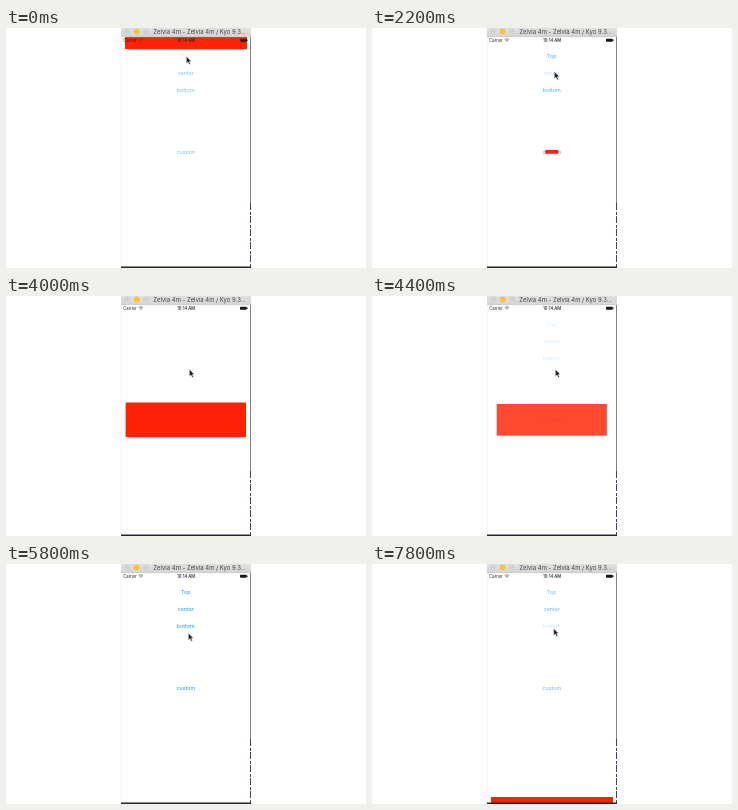
Animation, 360 px wide and 240 px high, one loop 8000 ms. Source, as an HTML page:

```html
<!DOCTYPE html>
<html lang="en">
<head>
<meta charset="utf-8">
<title>Popup demo</title>
<style>
  html, body { margin: 0; width: 100%; height: 100%; overflow: hidden; background: #fff; }
  svg { display: block; width: 100vw; height: 100vh; }
  text { font-family: Inter, "Open Sans", sans-serif; text-anchor: middle; }
  .title { font-size: 5.95px; fill: #444; }
  .status { font-size: 4.2px; fill: #222; }
  .button { font-size: 5.4px; fill: #2597ee; }
</style>
</head>
<body>
<svg viewBox="0 0 360 240">
  <defs>
    <linearGradient id="chrome" x2="0" y2="1">
      <stop stop-color="#e0e0e0"/>
      <stop offset="1" stop-color="#d4d4d4"/>
    </linearGradient>
  </defs>
  <rect width="360" height="240" fill="#fff"/>

  <g id="buttons">
    <text class="button" x="179.8" y="29.8">Top</text>
    <text class="button" x="179.8" y="46.8">center</text>
    <text class="button" x="179.8" y="63.9">bottom</text>
    <text class="button" x="179.8" y="125.7">custom</text>
  </g>

  <rect id="bar" fill="#ff2206"/>

  <g>
    <text class="status" x="124.1" y="13.7">Carrier</text>
    <g fill="none" stroke="#444" stroke-width=".6">
      <path d="M132.7 11.5q2.2-1.7 4.4 0"/>
      <path d="M133.6 12.6q1.3-1 2.6 0"/>
      <path d="M134.5 13.6h.8"/>
    </g>
    <text class="status" x="180" y="13.8" font-weight="500">10:14 AM</text>
    <rect x="234" y="10.8" width="6.8" height="2.9" rx=".6" fill="#181818"/>
    <rect x="241" y="11.6" width=".7" height="1.3" fill="#181818"/>
  </g>

  <rect x="115" width="130" height="9" fill="url(#chrome)"/>
  <path d="M115 8.8h130" stroke="#c4c4c4" stroke-width=".4"/>
  <circle cx="121.3" cy="3.4" r="2.8" fill="#d2d2d4"/>
  <circle cx="130.6" cy="3.4" r="2.8" fill="#fcc22f"/>
  <circle cx="140.2" cy="3.4" r="2.8" fill="#d2d2d4"/>
  <text class="title" x="193.6" y="5.6">Zelvia 4m - Zelvia 4m / Kyo 9.3...</text>

  <path d="M115.2 9v230" stroke="#e8e8e8" stroke-width=".5"/>
  <path d="M244.5 9v166" stroke="#5b6472" stroke-width=".8"/>
  <path d="M244.5 175v64" stroke="#34486a" stroke-dasharray="7 2 3 1"/>
  <path d="M115 239.3h130" stroke="#22262c" stroke-width="1.4"/>

  <path id="cursor" d="M0 0v7.2l1.7-1.5 1.2 2.6 1.3-.6-1.2-2.5h2.2z"
        fill="#222" stroke="#fff" stroke-width=".5"/>
</svg>
<script>
const LOOP = 8000, STEP = 200;
const SHOW = 900, HIDE = 950;
const SCREEN = { top: 9, bottom: 240 };
const BAR = { x: 119, width: 122, height: 34.6 };
const CENTER = { x: 179.8, y: 123.8, width: 120.4 };

// Each popup: the button that opens it, and when it opens and closes.
const popups = [
  { kind: 'top', button: 0, open: -360, close: 515, release: 300 },
  { kind: 'center', button: 1, open: 2015, close: 4150, release: 2500 },
  { kind: 'bottom', button: 2, open: 7540, close: 9500, release: 8000 }
];

// time, x, y of the pointer tip
const pointer = [
  [0, 180.3, 28.3], [500, 182.5, 56.5], [1100, 182.5, 56.5],
  [1700, 182.3, 43.6], [2500, 182.3, 43.6], [3400, 183.3, 73.3],
  [5100, 183.3, 73.3], [5800, 182.3, 69], [6800, 182.3, 69],
  [7500, 181.6, 64.4], [8000, 181.6, 64.4]
];

const buttons = document.getElementById('buttons');
const bar = document.getElementById('bar');
const cursor = document.getElementById('cursor');

const clamp = v => Math.min(1, Math.max(0, v));
const ease = v => {
  const t = clamp(v);
  return t * t * (3 - 2 * t);
};

function setAttrs(node, attrs) {
  for (const name in attrs) node.setAttribute(name, attrs[name]);
}

function pointerAt(t) {
  const i = pointer.findIndex(key => key[0] > t);
  const [t0, x0, y0] = pointer[i - 1], [t1, x1, y1] = pointer[i];
  const k = ease((t - t0) / (t1 - t0));
  return [x0 + (x1 - x0) * k, y0 + (y1 - y0) * k];
}

function barBox(kind, shown, hidden) {
  const { x, width, height } = BAR;
  if (kind === 'center') {
    const scale = shown * (1 - hidden / 2);
    const w = CENTER.width * scale, h = height * scale;
    return { x: CENTER.x - w / 2, y: CENTER.y - h / 2, width: w, height: h, opacity: 1 - hidden };
  }
  const h = height * shown * (1 - hidden);
  const y = kind === 'top' ? SCREEN.top : SCREEN.bottom - h;
  return { x, y, width, height: h, opacity: 1 };
}

function draw(t) {
  const popup = popups.find(p => t >= p.open && t < p.close + HIDE);
  const opened = popup ? clamp((t - popup.open) / SHOW) : 0;
  const hidden = popup ? ease((t - popup.close) / HIDE) : 0;

  setAttrs(bar, popup ? barBox(popup.kind, ease(opened), hidden) : { width: 0, height: 0 });
  // The white veil over the buttons fades in evenly and out with the bar.
  buttons.setAttribute('opacity', 1 - opened * (1 - hidden));
  [...buttons.children].forEach((label, i) => {
    const pressed = popup && popup.button === i && t < popup.release;
    label.setAttribute('opacity', pressed ? 0.35 : 1);
  });
  cursor.setAttribute('transform', `translate(${pointerAt(t)})`);
}

const start = performance.now();
function tick() {
  const t = (performance.now() - start) % LOOP;
  draw(Math.floor(t / STEP) * STEP);
  requestAnimationFrame(tick);
}
tick();
</script>
</body>
</html>
```
